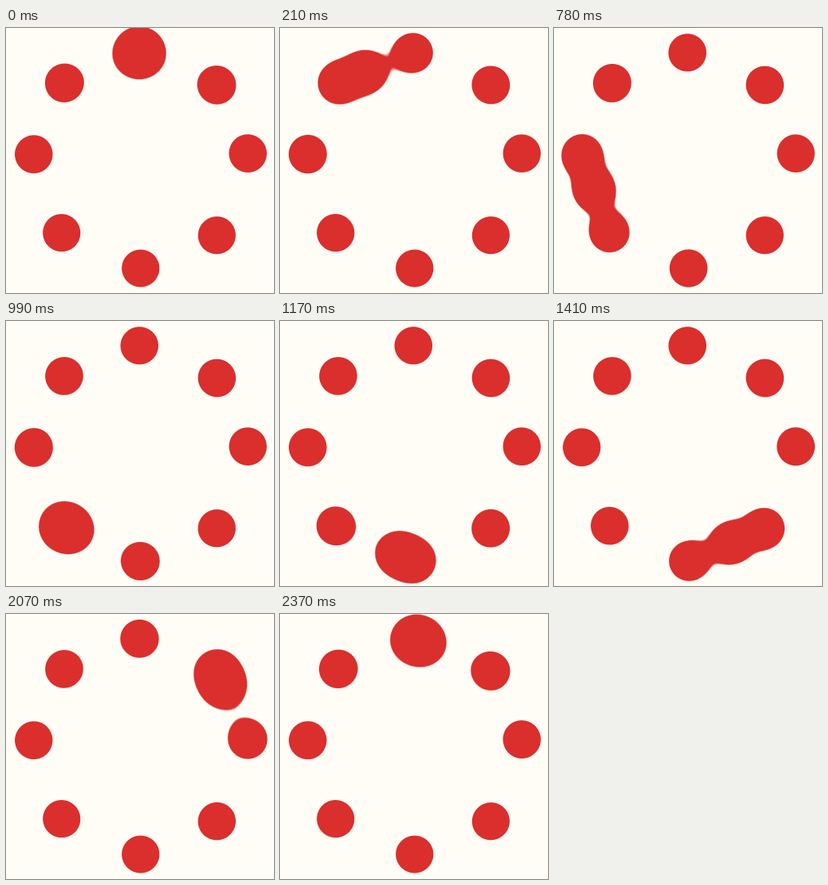
Recreate the animation shown at these times as an HTML page with a canvas. Size 336 by 332 pixels, loop 2400 ms.

```html
<!DOCTYPE html>
<html lang="en">
<head>
<meta charset="utf-8">
<title>Metaball ring loader</title>
<style>
  html, body { margin: 0; width: 100%; height: 100%; overflow: hidden; background: #fffdf6; }
  canvas { display: block; width: 336px; height: 332px; }
</style>
</head>
<body>
<canvas id="stage" width="336" height="332"></canvas>
<script>
const W = 336, H = 332, LOOP = 2400, REST = 30;
const PAPER = [255, 253, 246], RED = [218, 47, 45];
const CHARGE = 475; // squared radius of one isolated metaball
const EDGE = 14;    // field-to-coverage gain, about one pixel of antialiasing

// Ring of dots, counter-clockwise from the top
const dots = [
  [167.3, 30.5], [72.7, 68.6], [34.4, 158.3], [69.5, 256.9],
  [168.7, 301.4], [264.6, 259.9], [303.6, 157.3], [264.6, 71.1]
];

const ctx = document.getElementById('stage').getContext('2d');
const image = ctx.createImageData(W, H);

const pull = (x, y, [cx, cy]) =>
  CHARGE / ((x + 0.5 - cx) ** 2 + (y + 0.5 - cy) ** 2 + 1e-6);

const ringField = new Float32Array(W * H);
for (let y = 0, i = 0; y < H; y++) {
  for (let x = 0; x < W; x++, i++) {
    ringField[i] = dots.reduce((sum, dot) => sum + pull(x, y, dot), 0);
  }
}

// The ball rests briefly on each dot, then travels straight to the next
const departure = k => k === 0 ? 0 : 60 + 300 * k;
const arrival = k => k === 7 ? LOOP : departure(k + 1) - REST;

function ballAt(time) {
  let k = 7;
  while (time < departure(k)) k--;
  const p = Math.min(1, (time - departure(k)) / (arrival(k) - departure(k)));
  const [x0, y0] = dots[k], [x1, y1] = dots[(k + 1) % 8];
  return [x0 + (x1 - x0) * p, y0 + (y1 - y0) * p];
}

function draw(time) {
  const ball = ballAt(time);
  const px = image.data;
  for (let y = 0, i = 0; y < H; y++) {
    for (let x = 0; x < W; x++, i++) {
      const field = ringField[i] + pull(x, y, ball);
      const cover = Math.min(1, Math.max(0, (field - 1) * EDGE + 0.5));
      for (let c = 0; c < 3; c++) px[i * 4 + c] = PAPER[c] + (RED[c] - PAPER[c]) * cover;
      px[i * 4 + 3] = 255;
    }
  }
  ctx.putImageData(image, 0, 0);
}

const start = performance.now();
function frame() {
  draw((performance.now() - start) % LOOP);
  requestAnimationFrame(frame);
}
frame();
</script>
</body>
</html>
```
